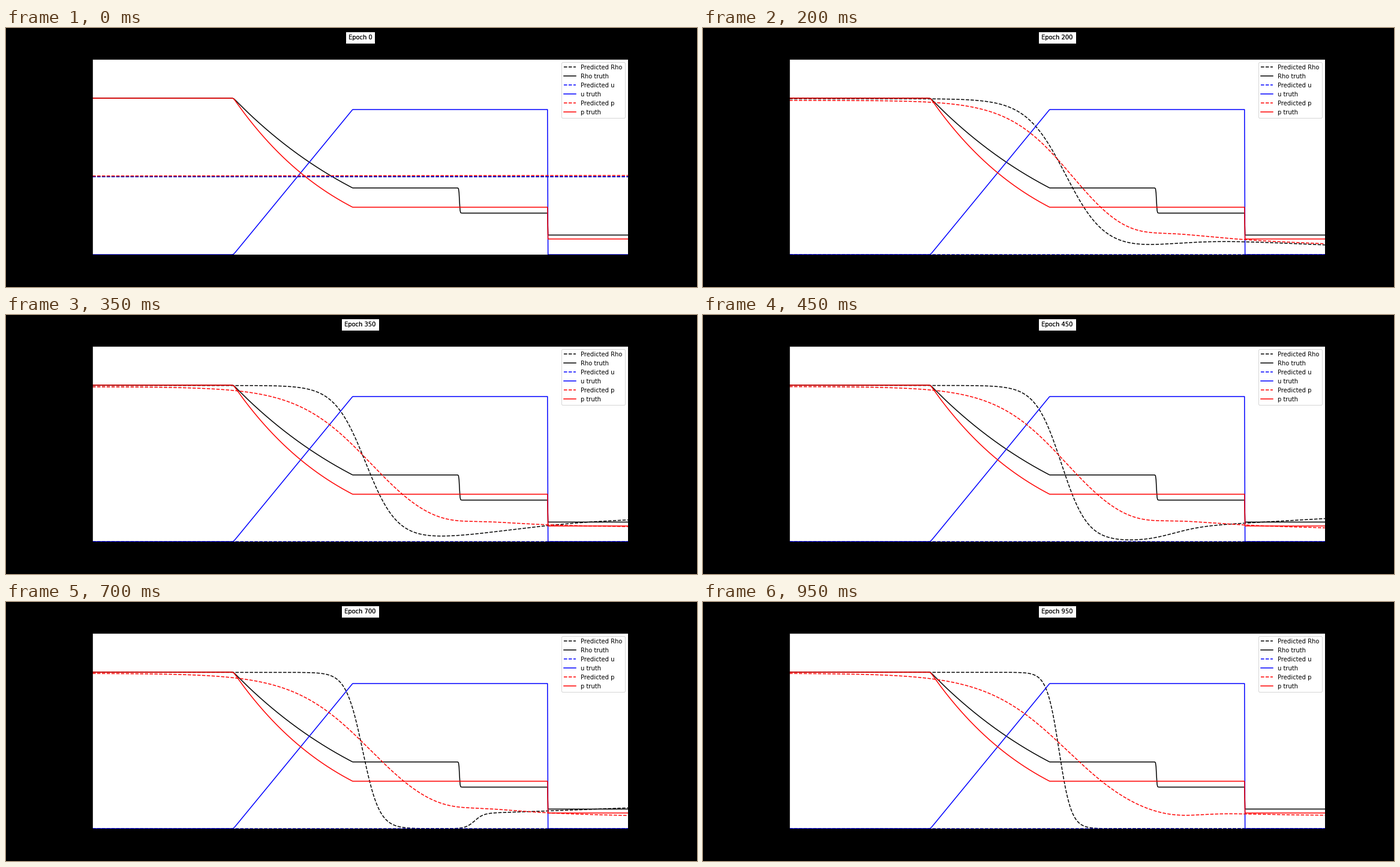
Recreate the animation shown at these times as a matplotlib script. Size 1152 by 432 pixels, loop 1000 ms.

```python
import numpy as np
import matplotlib.pyplot as plt
from matplotlib.animation import FuncAnimation

W, H, DPI = 1152, 432, 72
FRAMES, STEP = 20, 50

xs = np.linspace(0, 1, 1000)
px = 144 + 892.8 * xs           # the same points in stage pixels
SHOCK = 903                     # pixel column of the shock front

KEYS = [100, 300, 450, 600, 700, 950]


def track(epoch, *values):
    """Parameter value between the key epochs."""
    return np.interp(epoch, KEYS, values)


def rise(centre, width):
    return 1 / (1 + np.exp(np.clip((centre - px) / width, -60, 60)))


def fall(centre, width):
    return 1 - rise(centre, width)


def tail(level, centre, width, growth):
    """Plateau behind the step; level is its height at the shock front."""
    return level * rise(centre, width) * np.exp(growth * (px - SHOCK))


def density(epoch):
    e = max(epoch, KEYS[0])
    centre = 593 + 18 * np.exp((100 - e) / 250)
    width = 8 + 29 * np.exp(-((e - 100) / 430) ** 1.4)
    return (1 - .7 / e) * fall(centre, width) + tail(
        track(e, .036, .145, .119, .121, .113, 0),
        track(e, 716, 840, 780, 790, 781, 781),
        track(e, 12, 100, 26, 14, 7.5, 7.5),
        track(e, -.0055, 0, .0016, .0013, .0012, 0))


def pressure(epoch):
    e = max(epoch, KEYS[0])
    centre = track(e, 624, 610.5, 607, 609, 609, 608)
    width = track(e, 46, 63, 60, 64, 65, 68.6)
    amp = .993 - .011 * np.exp((100 - e) / 200)
    return amp * fall(centre, width) + tail(
        track(e, .083, .0995, .1, .092, .091, .084),
        track(e, 740, 763, 756, 752, 763, 818),
        27,
        track(e, -.0041, 0, -.001, -.0011, -.0007, 0))


def predict(epoch):
    learned = min(1, np.sqrt(epoch / KEYS[0]))
    rho = .5 + learned * (density(epoch) - .5)
    flat = .503 + .003 * xs
    p = flat + learned * (pressure(epoch) - flat)
    u = .498 * np.exp(-epoch / 20 * (1 + xs * epoch / 300))
    return rho, u, p


def shock_tube(t=.2, gamma=1.4):
    """Density, velocity and pressure of the Sod problem."""
    p_mid, u_mid, rho_l, rho_r = .30313, .92745, .42632, .26557
    c, soft = np.sqrt(gamma), .004
    foot = .5 - .07027 * t
    contact, shock = .5 + u_mid * t, .5 + 1.75216 * t
    fan = 2 / (gamma + 1) * (c + (xs - .5) / t)
    fan = soft * np.logaddexp(0, fan / soft)
    sound = 1 - (gamma - 1) / 2 * fan / c
    mid = rho_r + (rho_l - rho_r) / 2 * (1 - np.tanh((xs - contact) / .0011))
    where = [xs < foot, xs < shock]
    rho = np.select(where, [sound ** 5, mid], .125)
    u = np.select(where, [fan, u_mid], 0)
    p = np.select(where, [sound ** 7, p_mid], .1)
    return rho, u, p


fig = plt.figure(figsize=(W / DPI, H / DPI), dpi=DPI, facecolor="black")
ax = fig.add_axes([.125, .125, .775, .755])
ax.set(xlim=(0, 1), ylim=(0, 1.25), xticks=[], yticks=[])

predicted = []
for name, color, truth in zip(("Rho", "u", "p"), ("black", "blue", "red"), shock_tube()):
    predicted += ax.plot(xs, xs, "--", color=color, lw=1.5, label=f"Predicted {name}")
    ax.plot(xs, truth, color=color, lw=1.5, label=f"{name} truth")
ax.legend(loc="upper right", fontsize=10)

# the label is laid down twice, which darkens its edges
style = dict(transform=ax.transAxes, ha="center", fontsize=10)
titles = [ax.text(.5, 1.1, "", bbox=dict(facecolor="white", pad=5), **style),
          ax.text(.5, 1.1, "", **style)]


def update(i):
    epoch = i * STEP
    for line, y in zip(predicted, predict(epoch)):
        line.set_ydata(y)
    for title in titles:
        title.set_text(f"Epoch {epoch}")
    return predicted + titles


anim = FuncAnimation(fig, update, frames=FRAMES, interval=50, repeat=True)
plt.show()
```
